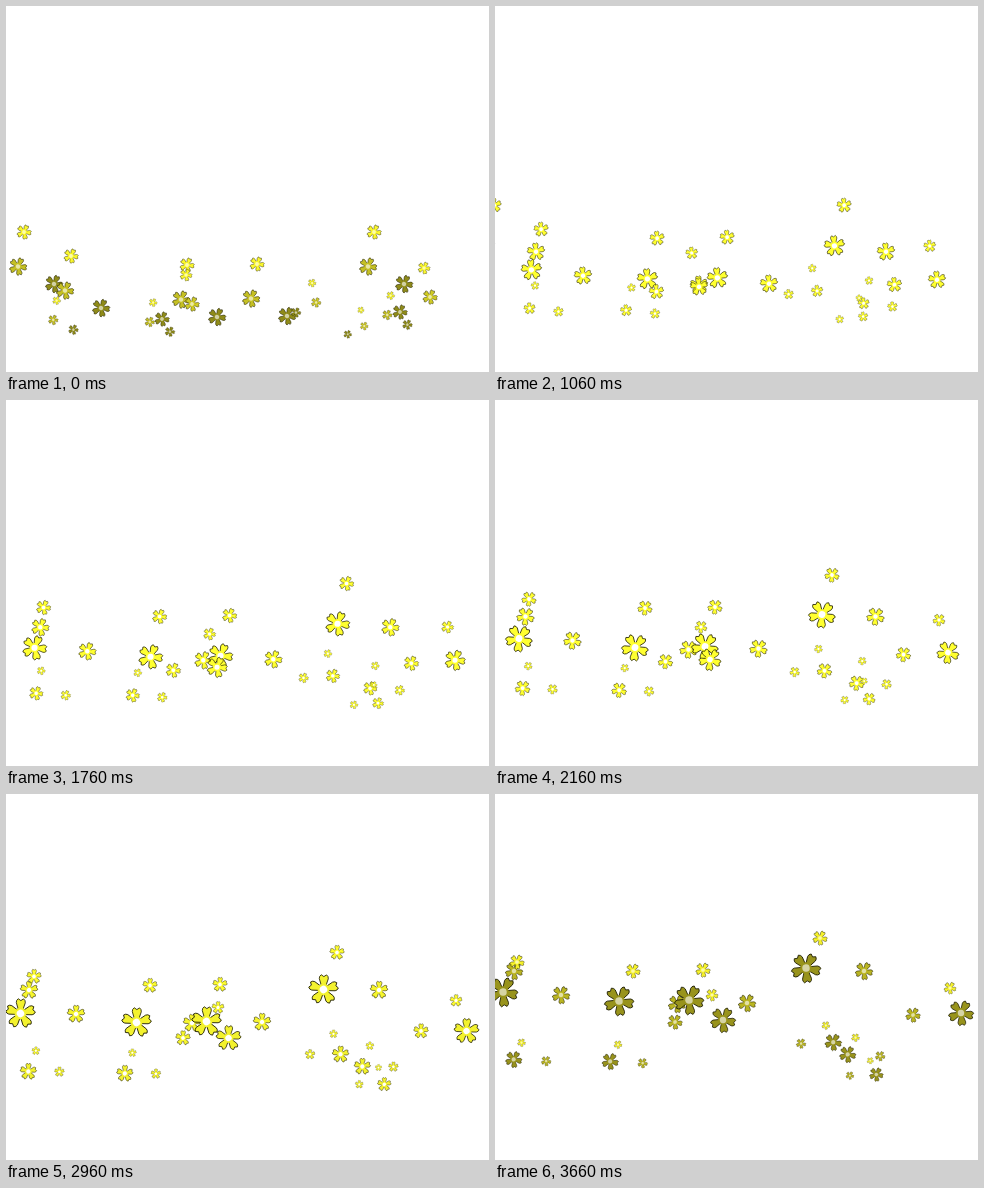
An HTML page without scripts that plays this animation: 483x366 px, repeating every 3760 ms.

```html
<!DOCTYPE html>
<html lang="en">
<head>
<meta charset="utf-8">
<title>Drifting blossoms</title>
<style>
  html, body { margin: 0; width: 100%; height: 100%; overflow: hidden; background: #fff; }
  svg { display: block; width: 483px; height: 366px; }

  .petal { stroke: #1c1b00; stroke-width: .55px; }
  .core { fill: currentColor; }

  .u, .v, .w, .a, .b, .c {
    --lit: #ffff30;
    animation: 3760ms infinite step-end, 3760ms infinite linear, 3760ms infinite steps(38);
    fill: var(--lit);
    color: #fff;
  }
  /* left-leaning trio */
  .u { animation-name: u, dim, spin; scale: .74; --in: #fbf82c; --out: #f6f22a; }
  .v { animation-name: v, dim, spin; --in: #c5c024; --out: #98931c; }
  .w { animation-name: w, dim, spin; scale: .9; --in: #8f8b19; --out: #bab522; }
  /* right-leaning trio */
  .a { animation-name: a, dim, spin; scale: .62; --in: #fbf82c; --out: #f6f22a; }
  .b { animation-name: b, dim, spin; --in: #d0cb25; --out: #98931c; }
  .c { animation-name: c, dim, spin; scale: .75; --in: #8f8b19; --out: #bab522; }

  @keyframes dim {
    0% { fill: var(--in); color: color-mix(in srgb, #fff 60%, var(--in)); }
    14%, 70% { fill: var(--lit); color: #fff; }
    78.72% { fill: color-mix(in srgb, var(--lit) 88%, var(--out)); color: #fff; }
    97.34%, 100% { fill: var(--out); color: color-mix(in srgb, #fff 60%, var(--out)); }
  }
  @keyframes spin { from { rotate: 25deg; } to { rotate: 183deg; } }

  @keyframes u {
    0% { translate: 368px 226px; animation-timing-function: step-end; }
    1.595% { translate: 366.3px 223.6px; animation-timing-function: steps(6); }
    17.553% { translate: 356px 209px; animation-timing-function: steps(7); }
    36.17% { translate: 344px 192px; animation-timing-function: steps(8); }
    57.446% { translate: 337px 175px; animation-timing-function: steps(5); }
    70.744% { translate: 333px 165px; animation-timing-function: steps(3); }
    78.723% { translate: 331px 158.5px; animation-timing-function: steps(7); }
    97.34%, 100% { translate: 325px 144px; }
  }
  @keyframes v {
    0% { translate: 362px 260.5px; scale: .9; animation-timing-function: step-end; }
    1.595% { translate: 359.4px 258.9px; scale: .9; animation-timing-function: steps(6); }
    17.553% { translate: 344px 249px; scale: .95; animation-timing-function: steps(7); }
    36.17% { translate: 336px 233px; scale: 1.12; animation-timing-function: steps(8); }
    57.446% { translate: 327px 214.5px; scale: 1.36; animation-timing-function: steps(5); }
    70.744% { translate: 321px 203px; scale: 1.45; animation-timing-function: steps(3); }
    78.723% { translate: 317.5px 195.5px; scale: 1.5; animation-timing-function: steps(7); }
    97.34%, 100% { translate: 311px 174px; scale: 1.5; }
  }
  @keyframes w {
    0% { translate: 398px 278px; animation-timing-function: step-end; }
    1.595% { translate: 397.6px 274.9px; animation-timing-function: steps(6); }
    17.553% { translate: 395px 256px; animation-timing-function: steps(7); }
    36.17% { translate: 388px 238px; animation-timing-function: steps(8); }
    57.446% { translate: 380.5px 216.5px; animation-timing-function: steps(5); }
    70.744% { translate: 376px 203.5px; animation-timing-function: steps(3); }
    78.723% { translate: 373px 196px; animation-timing-function: steps(7); }
    97.34%, 100% { translate: 369px 177px; }
  }
  @keyframes a {
    0% { translate: 418px 262px; animation-timing-function: step-end; }
    1.595% { translate: 419.6px 260px; animation-timing-function: steps(6); }
    17.553% { translate: 429px 248px; animation-timing-function: steps(7); }
    36.17% { translate: 439px 234px; animation-timing-function: steps(8); }
    57.446% { translate: 444px 220px; animation-timing-function: steps(5); }
    70.744% { translate: 447.5px 211.5px; animation-timing-function: steps(3); }
    78.723% { translate: 450px 206.5px; animation-timing-function: steps(7); }
    97.34%, 100% { translate: 455px 194px; }
  }
  @keyframes b {
    0% { translate: 424px 291px; scale: .75; animation-timing-function: step-end; }
    1.595% { translate: 426px 289.6px; scale: .76; animation-timing-function: steps(6); }
    17.553% { translate: 438px 281.5px; scale: .8; animation-timing-function: steps(7); }
    36.17% { translate: 445px 268px; scale: .95; animation-timing-function: steps(8); }
    57.446% { translate: 453px 252.5px; scale: 1.13; animation-timing-function: steps(5); }
    70.744% { translate: 458px 243px; scale: 1.22; animation-timing-function: steps(3); }
    78.723% { translate: 460.5px 237px; scale: 1.27; animation-timing-function: steps(7); }
    97.34%, 100% { translate: 466px 219px; scale: 1.28; }
  }
  @keyframes c {
    0% { translate: 394px 306px; animation-timing-function: step-end; }
    1.595% { translate: 394.3px 303.3px; animation-timing-function: steps(6); }
    17.553% { translate: 396px 287.5px; animation-timing-function: steps(7); }
    36.17% { translate: 402px 272px; animation-timing-function: steps(8); }
    57.446% { translate: 408.5px 254.5px; animation-timing-function: steps(5); }
    70.744% { translate: 412.5px 243.5px; animation-timing-function: steps(3); }
    78.723% { translate: 415px 237px; animation-timing-function: steps(7); }
    97.34%, 100% { translate: 418px 221px; }
  }
</style>
</head>
<body>
<svg viewBox="0 0 483 366">
  <defs>
    <path id="p" class="petal" d="M-1.2-1.5L-3-7.2Q-3.2-8.8-1.8-9.8L0-8.6L1.8-9.8Q3.2-8.8 3-7.2L1.2-1.5Z"/>
    <g id="f">
      <use href="#p"/>
      <use href="#p" transform="rotate(72)"/>
      <use href="#p" transform="rotate(144)"/>
      <use href="#p" transform="rotate(216)"/>
      <use href="#p" transform="rotate(288)"/>
      <circle r="3.9"/>
      <circle class="core" r="2.5"/>
    </g>
  </defs>

  <!-- left-leaning trios -->
  <g><use class="w" href="#f"/><use class="v" href="#f"/><use class="u" href="#f"/></g>
  <g transform="translate(-350 0)"><use class="w" href="#f"/><use class="v" href="#f"/><use class="u" href="#f"/></g>
  <g transform="translate(-303 24)"><use class="w" href="#f"/><use class="v" href="#f"/><use class="u" href="#f"/></g>
  <g transform="translate(-187 33)"><use class="w" href="#f"/><use class="v" href="#f"/><use class="u" href="#f"/></g>
  <g transform="translate(-117 32)"><use class="w" href="#f"/><use class="v" href="#f"/><use class="u" href="#f"/></g>
  <g transform="translate(-155.5 168) scale(.56)"><use class="w" href="#f"/><use class="v" href="#f"/><use class="u" href="#f"/></g>
  <g transform="translate(-59 170) scale(.56)"><use class="w" href="#f"/><use class="v" href="#f"/><use class="u" href="#f"/></g>
  <g transform="translate(178.5 163) scale(.56)"><use class="w" href="#f"/><use class="v" href="#f"/><use class="u" href="#f"/></g>

  <!-- right-leaning trios -->
  <g><use class="c" href="#f"/><use class="b" href="#f"/><use class="a" href="#f"/></g>
  <g transform="translate(-238 7)"><use class="c" href="#f"/><use class="b" href="#f"/><use class="a" href="#f"/></g>
  <g transform="translate(26 101.5) scale(.67)"><use class="c" href="#f"/><use class="b" href="#f"/><use class="a" href="#f"/></g>
  <g transform="translate(125 160) scale(.55)"><use class="c" href="#f"/><use class="b" href="#f"/><use class="a" href="#f"/></g>
</svg>
</body>
</html>
```
